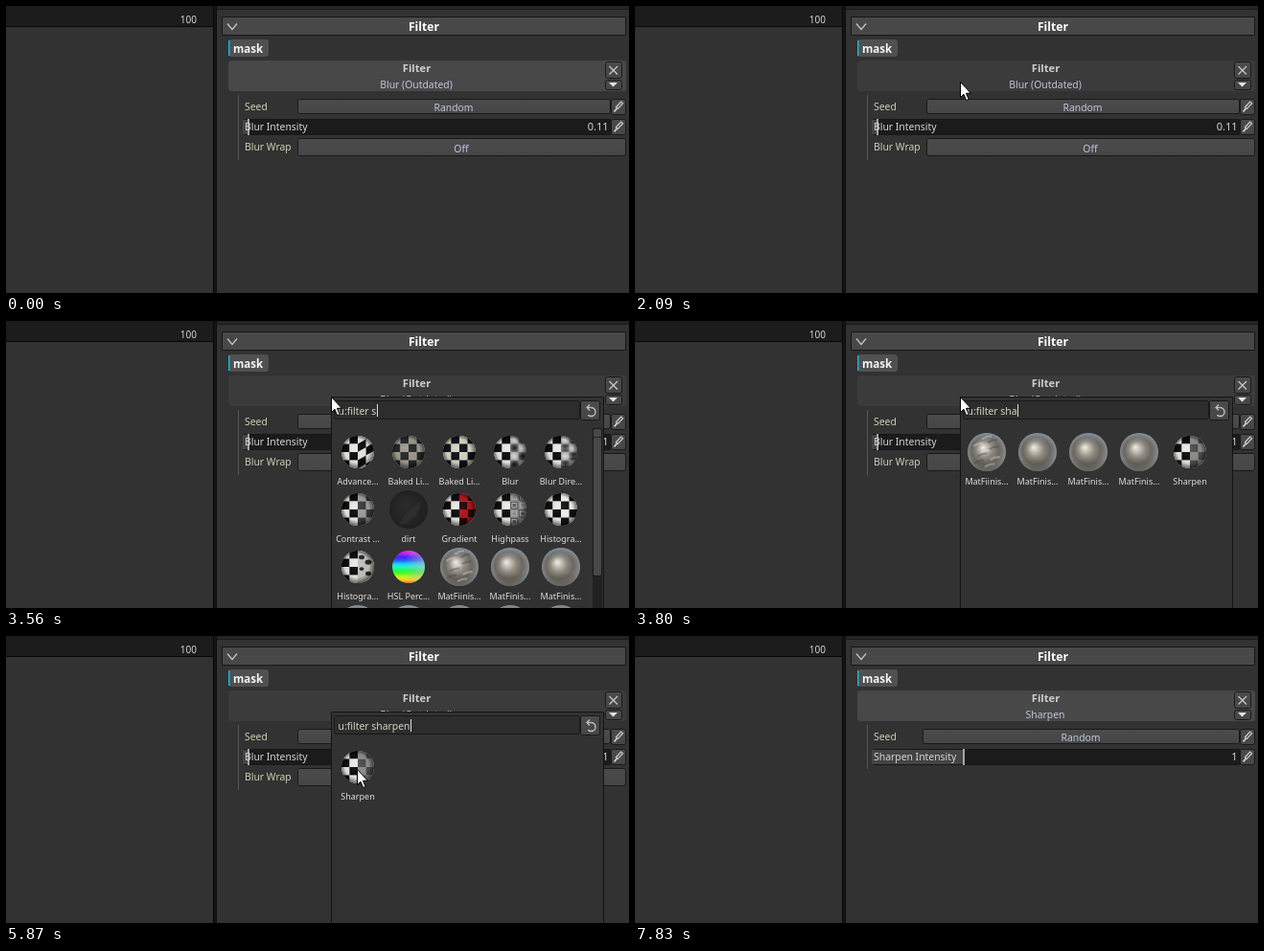
An HTML page with a canvas that plays this animation: 650x300 px, repeating every 8160 ms.

```html
<!DOCTYPE html>
<html>
<head>
<meta charset="utf-8">
<style>
html, body { margin: 0; width: 100%; height: 100%; overflow: hidden; background: #323232; }
canvas { display: block; }
</style>
</head>
<body>
<canvas id="stage" width="650" height="300"></canvas>
<script>
const ctx = document.getElementById('stage').getContext('2d');
const LOOP = 8160, STEP = 120, TAU = Math.PI * 2;
const FONT = '"Noto Sans", "Open Sans", sans-serif';

function rect(x, y, w, h, color) {
  ctx.fillStyle = color;
  ctx.fillRect(x, y, w, h);
}

function box(x, y, w, h, fill, border = '#191919', radius = 2) {
  ctx.beginPath();
  ctx.roundRect(x + 0.5, y + 0.5, w - 1, h - 1, radius);
  ctx.fillStyle = fill;
  ctx.fill();
  ctx.strokeStyle = border;
  ctx.lineWidth = 1;
  ctx.stroke();
}

function raised(x, y, w, h) {
  const g = ctx.createLinearGradient(0, y, 0, y + h);
  g.addColorStop(0, '#4b4b4b');
  g.addColorStop(1, '#464646');
  box(x, y, w, h, g);
}

function text(str, x, y, { size = 10.4, color = '#d4d4d4', align = 'left', bold = false } = {}) {
  ctx.font = `${bold ? 'bold ' : ''}${size}px ${FONT}`;
  ctx.textAlign = align;
  ctx.textBaseline = 'alphabetic';
  ctx.fillStyle = color;
  ctx.fillText(str, x, y);
}

function path(points, close) {
  ctx.beginPath();
  points.forEach(([x, y]) => ctx.lineTo(x, y));
  if (close) ctx.closePath();
}

function line(points, color, width = 1.2) {
  path(points);
  ctx.strokeStyle = color;
  ctx.lineWidth = width;
  ctx.stroke();
}

function pencilButton(y) {
  raised(631, y, 16, 17);
  line([[637, y + 10], [643, y + 3.5]], '#d0d0d0', 3.8);
  line([[637.8, y + 9.2], [642.3, y + 4.3]], '#555', 1.4);
  line([[634.5, y + 13.5], [637.5, y + 10]], '#d0d0d0', 1.8);
}

function drawFrame() {
  rect(0, 0, 650, 300, '#323232');
  rect(0, 0, 216, 21, '#1c1c1c');
  rect(0, 21, 216, 1, '#080808');
  text('100', 199, 18, { size: 10, align: 'right' });
  rect(216, 0, 4, 300, '#151515');
  rect(216, 0, 1, 300, '#060606');
  rect(219, 0, 1, 300, '#0b0b0b');
  rect(220, 0, 430, 3, '#252525');
  rect(220, 3, 430, 1, '#191919');

  box(225, 11, 422, 20, '#484848', '#171717', 0);
  line([[231, 18.5], [236, 24.5], [241, 18.5]], '#c8c8c8');
  text('Filter', 436, 25.5, { size: 12.2, bold: true, align: 'center', color: '#fff' });
  box(232, 35, 42, 18, '#505050', '#505050');
  rect(232, 36, 1.5, 16, '#16b4d8');
  text('mask', 237, 49, { size: 11.5, bold: true, color: '#f4f4f4' });
}

function drawHeader(name, hovered) {
  const fill = hovered ? '#3b3b3b' : '#484848';
  box(232, 57, 415, 32, fill, fill);
  text('Filter', 428.5, 69, { size: 11.2, bold: true, align: 'center', color: '#cecece' });
  text(name, 428, 86, { align: 'center', color: '#bfc6dc' });
  raised(625, 58, 18, 18);
  line([[629.5, 63], [638, 71.5]], '#c8c8c8');
  line([[638, 63], [629.5, 71.5]], '#c8c8c8');
  raised(625, 77, 18, 11);
  path([[629, 80], [638, 80], [633.5, 84.5]], true);
  ctx.fillStyle = '#e4e4e4';
  ctx.fill();
}

function drawSlider(label, value, handle) {
  box(247, 118, 385, 17, '#1b1b1b', '#171717');
  rect(247, 119, handle - 247, 15, '#444');
  rect(handle, 118, 2, 17, '#a6a6a6');
  text(label, 249, 130);
  text(value, 628.5, 130, { size: 11, align: 'right' });
  pencilButton(118);
}

function drawSettings(sharpen) {
  rect(242, 93, 1, sharpen ? 46 : 68, '#565656');
  const left = sharpen ? 300 : 304;
  text('Seed', 249, 109, { color: '#d0cdb4' });
  raised(left, 97, 631 - left, 16);
  text('Random', (left + 630) / 2, 109.5, { align: 'center', color: '#bfc6dc' });
  pencilButton(97);
  if (sharpen) return drawSlider('Sharpen Intensity', '1', 342);
  drawSlider('Blur Intensity', '0.11', 252);
  text('Blur Wrap', 249, 151, { color: '#d0cdb4' });
  raised(304, 138, 343, 19);
  text('Off', 475, 152.5, { align: 'center', color: '#bfc6dc' });
}

function shade(r, stops, hx = -0.2, hy = -0.25) {
  const g = ctx.createRadialGradient(r * hx, r * hy, 0, 0, 0, r * 1.05);
  stops.forEach(([at, color]) => g.addColorStop(at, color));
  ctx.fillStyle = g;
  ctx.fillRect(-r, -r, 2 * r, 2 * r);
}

function fade(x0, y0, x1, y1, stops) {
  const g = ctx.createLinearGradient(x0, y0, x1, y1);
  stops.forEach(([at, color]) => g.addColorStop(at, color));
  rect(-20, -20, 40, 40, g);
}

const BALL_SHADE = [[0, 'rgba(255,255,255,.08)'], [0.7, 'rgba(0,0,0,.05)'], [1, 'rgba(0,0,0,.65)']];
const PLAIN = ['#0c0c0c', '#e9e9e6'];
const WHOLE = { baked: ['#24282a', '#a09a8c'], baked2: ['#0d1218', '#d8d4c4'] };
const RIGHT = {
  sharpen: ['#4e4e4e', '#8e8e8e'], highpass: ['#5c5c5c', '#8e8e8e'], red: ['#260808', '#b8161b'],
  contrast: ['#3c3c3c', '#a0a0a0'], levels: ['#141414', '#f4f6ee']
};

function softSpot(x, y, size, tone) {
  const g = ctx.createRadialGradient(x, y, 0, x, y, size * 0.75);
  g.addColorStop(0, `rgba(${tone},${tone},${tone},1)`);
  g.addColorStop(1, `rgba(${tone},${tone},${tone},0)`);
  rect(x - size / 2, y - size / 2, size, size, g);
}

// Checkered ball: plain squares on the left, the filter's effect on the right.
function checkers(kind) {
  const size = 8.6;
  const soft = kind === 'blur' || kind === 'streak';
  rect(-17, -17, 34, 34, soft ? '#999' : '#e9e9e6');
  for (let row = -2; row < 3; row++) {
    for (let col = -2; col < 2; col++) {
      const light = (row + col) % 2 === 0 ? 1 : 0, x = col * size, y = row * size;
      const right = col >= 0;
      if (soft && right) {
        softSpot(x + size / 2, y + size / 2, size, light ? 225 : 18);
        continue;
      }
      const colors = WHOLE[kind] || (right && RIGHT[kind]) || PLAIN;
      const lift = kind === 'skew' && right ? -5 : 0, y0 = y + lift * col, y1 = y0 + lift;
      path([[x, y0], [x + size + 0.2, y1], [x + size + 0.2, y1 + size + 0.2], [x, y0 + size + 0.2]], true);
      ctx.fillStyle = colors[light];
      ctx.fill();
      if (kind === 'highpass' && right) {
        ctx.strokeStyle = '#b4b4b4';
        ctx.lineWidth = 1;
        ctx.strokeRect(x + 2, y + 2, size - 4, size - 4);
      }
    }
  }
  if (kind === 'streak') {
    for (let y = -17; y < 17; y += 8.6) rect(1, y + 3, 16, 3, 'rgba(235,235,235,.25)');
  }
  if (kind === 'spots') {
    rect(0, -17, 17, 34, '#c6c6c0');
    [[4, -10, 3], [11, -5, 3.5], [4, 2, 2.5], [11, 7, 3]].forEach(([x, y, r]) => {
      ctx.beginPath();
      ctx.ellipse(x, y, r, r * 0.75, 0, 0, TAU);
      ctx.fillStyle = '#292929';
      ctx.fill();
    });
  }
  shade(17, BALL_SHADE);
}

function hueBall() {
  const hues = Array.from({ length: 11 }, (_, i) => [i / 10, `hsl(${310 - i * 29}, 95%, 55%)`]);
  fade(0, -17, 0, 17, hues);
  fade(-4, 0, 17, 0, [[0, 'rgba(190,190,190,0)'], [1, 'rgba(190,190,190,.6)']]);
}

function metalBall(rough) {
  shade(20, [[0, '#f2f0ea'], [0.16, '#cbc7bd'], [0.42, '#8d887e'], [0.68, '#6b675f'], [0.86, '#7c7d7e'], [1, '#929aa0']]);
  fade(0, -20, 0, 20, [[0, 'rgba(130,155,175,.45)'], [0.3, 'rgba(130,155,175,0)'], [0.65, 'rgba(50,42,30,0)'], [1, 'rgba(50,42,30,.4)']]);
  if (!rough) return;
  for (let i = 0; i < 9; i++) {
    const y = -15 + i * 3.6, x = 9 * Math.sin(i * 2.4);
    line([[x - 5, y + 1.5], [x, y - 1], [x + 5, y - 1.5]],
      i % 2 ? 'rgba(60,60,60,.35)' : 'rgba(225,225,220,.35)', 2.2);
  }
}

function dirtBall() {
  shade(20, [[0, '#2b2c2b'], [0.6, '#242524'], [1, '#1e1f1e']]);
  path([[-10, 16], [-2, 3], [13, -8], [9, 4], [-2, 15]], true);
  ctx.fillStyle = 'rgba(70,70,70,.25)';
  ctx.fill();
}

function ball(kind, x, y) {
  const big = ['metal', 'rough', 'dirt'].includes(kind);
  ctx.save();
  ctx.translate(x, y);
  ctx.beginPath();
  ctx.arc(0, 0, big ? 20 : 17, 0, TAU);
  ctx.clip();
  if (kind === 'hue') hueBall();
  else if (kind === 'dirt') dirtBall();
  else if (big) metalBall(kind === 'rough');
  else checkers(kind);
  ctx.restore();
}

const METALS = [['MatFiinis...', 'rough'], ['MatFinis...', 'metal'], ['MatFinis...', 'metal'], ['MatFinis...', 'metal']];
const SHARPEN = ['Sharpen', 'sharpen'];
const ALL = [
  ['Advance...', 'skew'], ['Baked Li...', 'baked'], ['Baked Li...', 'baked2'], ['Blur', 'blur'], ['Blur Dire...', 'streak'],
  ['Contrast ...', 'contrast'], ['dirt', 'dirt'], ['Gradient', 'red'], ['Highpass', 'highpass'], ['Histogra...', 'levels'],
  ['Histogra...', 'spots'], ['HSL Perc...', 'hue'], ...METALS.slice(0, 3),
  ...Array(5).fill(['', 'metal'])
];

function itemsAt(t) {
  if (t < 3800) return ALL;
  return t < 4050 ? [...METALS, SHARPEN] : [SHARPEN];
}

const KEYS = [[3560, 's'], [3800, 'sha'], [4050, 'shar'], [4170, 'sharp'], [4290, 'sharpe'], [4410, 'sharpen']];
const CARET_OFF = [[2580, 2830], [3190, 3440], [4900, 5150], [5510, 5750], [6110, 6360]];

function drawPopup(t) {
  box(339, 79, 285, 230, '#323232', '#141414', 0);
  box(342, 83, 257, 20, '#2d2d2d', '#191919');
  raised(599, 83, 21, 21);
  ctx.beginPath();
  ctx.arc(610.5, 95, 4.5, -Math.PI / 2, Math.PI * 0.75);
  ctx.strokeStyle = '#c6c6c6';
  ctx.lineWidth = 1.3;
  ctx.stroke();
  line([[610.5, 90.5], [606.5, 90.5]], '#c6c6c6');
  line([[609, 87.5], [606, 90.5], [609, 93.5]], '#c6c6c6');

  const typed = KEYS.filter(([at]) => t >= at).pop();
  const query = 'u:filter ' + (typed ? typed[1] : '');
  text(query, 346.5, 97.5, { color: '#d6d2c0' });
  if (!CARET_OFF.some(([from, to]) => t >= from && t < to)) {
    rect(Math.round(347.3 + ctx.measureText(query).width), 87, 1, 13, '#e0e0e0');
  }

  const items = itemsAt(t);
  items.forEach(([label, kind], i) => {
    const x = 367 + 53 * (i % 5), y = 137 + 60 * Math.floor(i / 5);
    ball(kind, x, y);
    text(label, x, y + 34, { size: 9, align: 'center', color: '#dcdcdc' });
  });
  if (items === ALL) {
    rect(612, 112, 10, 188, '#222');
    box(612, 112, 10, 155, '#484848');
    rect(613, 121, 8, 1, '#242424');
  }
}

function drawPointer([x, y]) {
  ctx.save();
  ctx.translate(x, y);
  path([[0.5, 0.5], [0.5, 16.5], [4, 13.3], [6.6, 19.6], [9.2, 18.5], [6.5, 12.3], [11.3, 12.1]], true);
  ctx.fillStyle = '#fff';
  ctx.fill();
  ctx.strokeStyle = '#000';
  ctx.lineWidth = 1;
  ctx.stroke();
  ctx.restore();
}

const ENTRY = [560, 271], HEADER = [339, 79], RESULT = [366, 139], EXIT = [600, 312];
const smooth = p => p * p * (3 - 2 * p);

// The screen is sampled every STEP ms, so the pointer moves in jumps.
function glide(a, b, t, start, steps, ease) {
  const p = Math.min(1, Math.max(0, Math.floor((t - start) / STEP + 1e-6) / steps));
  const e = ease(p);
  return a.map((v, i) => Math.round(v + (b[i] - v) * e));
}

function pointerAt(t) {
  if (t < 1370 || t >= 7830) return null;
  if (t < 5150) return glide(ENTRY, HEADER, t, 1370, 6, p => 1 - (1 - p) ** 2);
  if (t < 7110) return glide(HEADER, RESULT, t, 5150, 6, smooth);
  return glide(RESULT, EXIT, t, 7110, 6, p => p ** 1.5);
}

function draw(t) {
  const done = t >= 6360, pointer = pointerAt(t);
  const popup = t >= 2210 && !done;
  const hovered = !done && pointer && (popup || pointer[1] < 89);
  drawFrame();
  drawHeader(done ? 'Sharpen' : 'Blur (Outdated)', hovered);
  drawSettings(done);
  if (popup) drawPopup(t);
  if (pointer) drawPointer(pointer);
}

function tick() {
  draw(performance.now() % LOOP);
  requestAnimationFrame(tick);
}
tick();
</script>
</body>
</html>
```
